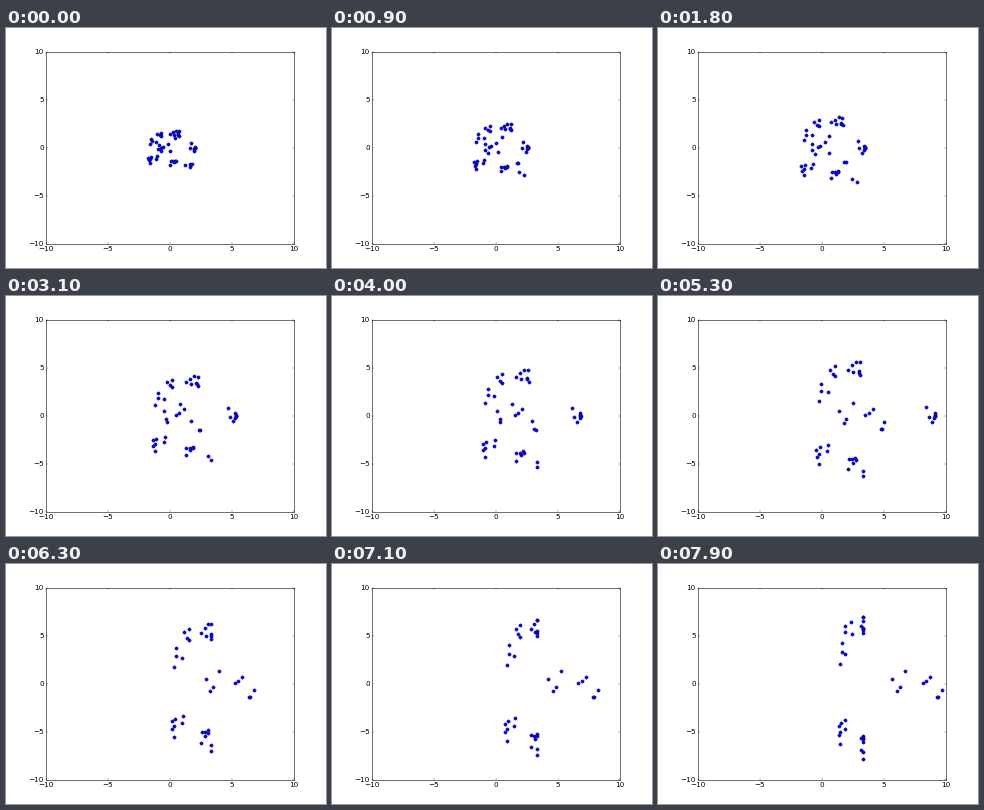
Write a matplotlib script that moves like this. It is 320 px wide and 240 px high and loops after 8000 ms.

```python
import numpy as np
import matplotlib.pyplot as plt
from matplotlib.animation import FuncAnimation

plt.style.use("classic")
plt.rcParams.update({
    "font.family": "DejaVu Sans",
    "figure.facecolor": "white",
    "savefig.facecolor": "white",
    "savefig.dpi": "figure",
})

FRAMES = 80
INNER_WALL, OUTER_WALL = 1.85, 3.3
JET_SPEED = 0.184  # units per frame
RAMP = 10          # frames a jet takes to speed up

# Clumps of the starting cloud: centre x, centre y, number of dots
CLUMPS = [
    (-1.1, 1.6, 4), (0.3, 1.4, 9), (-1.5, 0.6, 4), (-0.7, -0.1, 5),
    (0.1, 0.0, 2), (1.7, 0.1, 8), (-1.4, -1.2, 7), (0.4, -1.5, 6),
    (1.6, -1.7, 4),
]


def make_cloud():
    rng = np.random.default_rng(4)
    dots = [np.array([x, y]) + rng.uniform(-0.42, 0.42, (n, 2))
            for x, y, n in CLUMPS]
    return np.clip(np.concatenate(dots), -2, 2).T


X0, Y0 = make_cloud()
# Dots inside a wedge that opens to the right pass the gap in the walls.
MARGIN = 0.6 * (X0 + 1.4) - np.abs(Y0)
IN_JET = MARGIN > 0


def jet(x, y, margin, t):
    """Speed up smoothly, later near the edge of the wedge."""
    start = 10 + 36 * np.exp(-1.5 * margin)

    def ramp(s):
        return RAMP * np.log1p(np.exp((s - start) / RAMP))

    lane = 1.4 * np.tanh(1.6 * y)
    return (x + JET_SPEED * (ramp(t) - ramp(0)),
            y + (lane - y) * (1 - np.exp(-t / 15)))


def fan(x, y, t):
    """Spread up and down while drifting against the walls."""
    u = t / (FRAMES - 1)
    wall = np.where(x < -0.75, INNER_WALL, OUTER_WALL)
    drift = 3.1 * u + 2 * u * (1 - u) * x
    spread = 1 + 2.5 * (1 - (1 - u) ** 1.25)
    return np.minimum(x + drift, wall), y * spread + 0.8 * u * np.sign(y)


def positions(t):
    jx, jy = jet(X0[IN_JET], Y0[IN_JET], MARGIN[IN_JET], t)
    fx, fy = fan(X0[~IN_JET], Y0[~IN_JET], t)
    return np.append(jx, fx), np.append(jy, fy)


fig = plt.figure(figsize=(8, 6), dpi=40)
ax = fig.add_axes([0.125, 0.1, 0.775, 0.8])
ax.set(xlim=(-10, 10), ylim=(-10, 10),
       xticks=range(-10, 11, 5), yticks=range(-10, 11, 5))
ax.tick_params(labelsize=13)
dots, = ax.plot([], [], "bo", ms=6)


def update(i):
    dots.set_data(*positions(i))
    return dots,


anim = FuncAnimation(fig, update, frames=FRAMES, interval=100,
                     repeat=True, repeat_delay=0)
plt.show()
```
